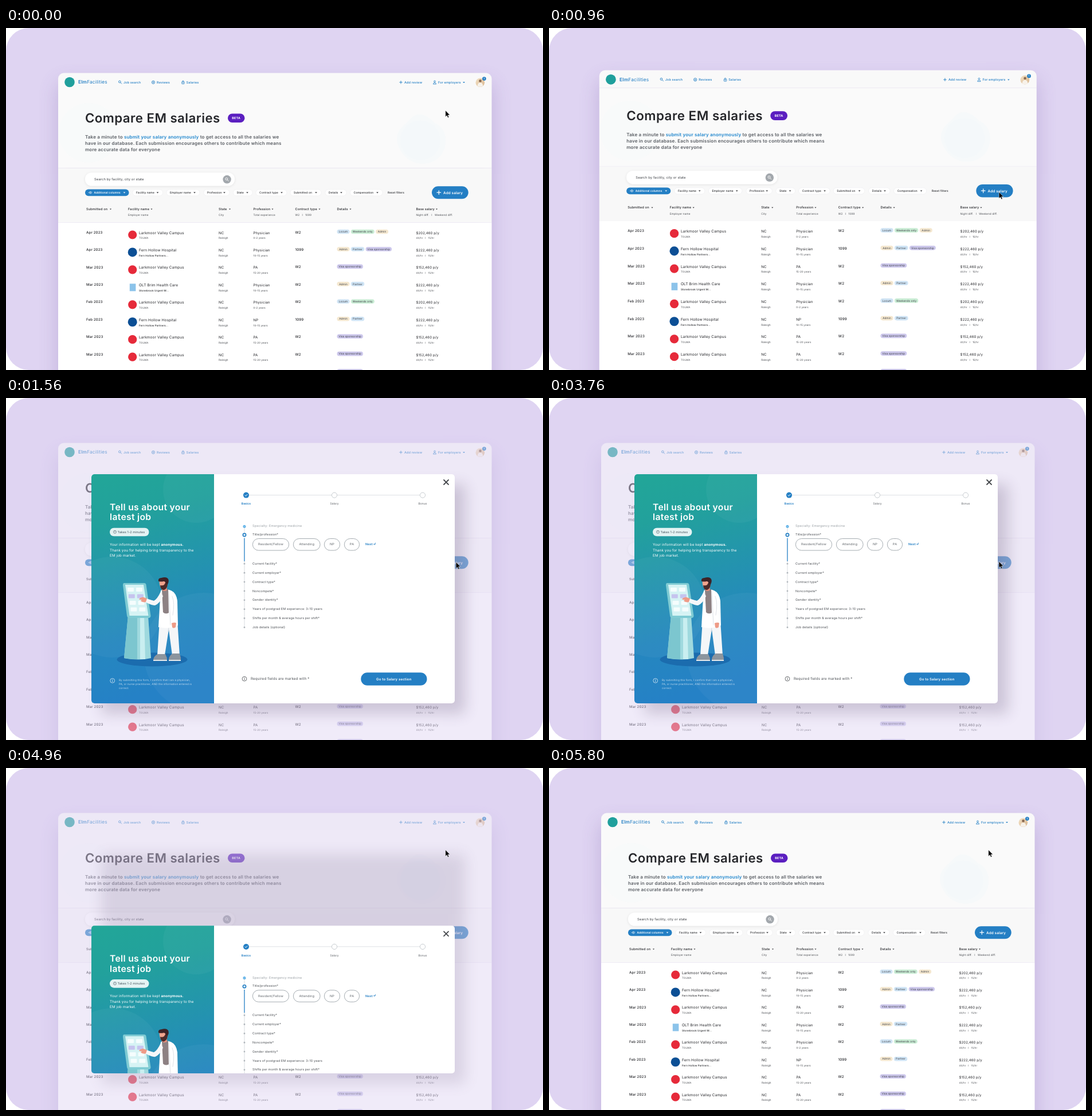
Write an HTML page that moves like this. It is 937 px wide and 597 px high and loops after 6 s.

```html
<!DOCTYPE html>
<html lang="en">
<head>
<meta charset="utf-8">
<title>Salary comparison</title>
<style>
html, body { margin: 0; width: 100%; height: 100%; overflow: hidden; background: #fff; }
svg { display: block; width: 937px; height: 597px; }
text { font-family: Inter, "Open Sans", sans-serif; letter-spacing: .02em; text-rendering: geometricPrecision; white-space: pre; }
</style>
</head>
<body>
<svg id="stage" viewBox="0 0 937 597" xmlns="http://www.w3.org/2000/svg"></svg>
<script>
const BLUE = '#247fc4', INK = '#26272b', GREY = '#4a4d52', LILAC = '#dfd4f2';

// Drawing helpers
const text = (x, y, size, str, fill = INK, weight = 400, anchor = 'start') =>
  `<text x="${x}" y="${y}" font-size="${size}" fill="${fill}" font-weight="${weight}" text-anchor="${anchor}">${str}</text>`;
const rect = (x, y, w, h, r, fill, extra = '') =>
  `<rect x="${x}" y="${y}" width="${w}" height="${h}" rx="${r}" fill="${fill}" ${extra}/>`;
const circle = (x, y, r, fill, extra = '') => `<circle cx="${x}" cy="${y}" r="${r}" fill="${fill}" ${extra}/>`;
const path = (d, fill, extra = '') => `<path d="${d}" fill="${fill}" ${extra}/>`;
const line = (d, color, w = 1, extra = '') => path(d, 'none', `stroke="${color}" stroke-width="${w}" stroke-linecap="round" stroke-linejoin="round" ${extra}`);
const caret = (x, y, fill = INK, s = 1.8) => path(`M${x - s} ${y - s / 2}h${2 * s}l${-s} ${s * 1.15}z`, fill);
const plus = (x, y, s, color, w) => line(`M${x - s} ${y}h${2 * s}M${x} ${y - s}v${2 * s}`, color, w);
const lens = (x, y, s, color, w) =>
  circle(x - s * .25, y - s * .25, s * .7, 'none', `stroke="${color}" stroke-width="${w}"`) +
  line(`M${x + s * .3} ${y + s * .3}l${s * .75} ${s * .75}`, color, w);
const info = (x, y, color) =>
  circle(x, y, 3.9, 'none', `stroke="${color}" stroke-width=".8"`) +
  line(`M${x} ${y - .3}v2`, color, .9) + circle(x, y - 1.9, .55, color);

function navBar() {
  return path('M91 109V88.5a10 10 0 0 1 10-10H837.500a10 10 0 0 1 10 10V109z', '#f9f9f9') +
    circle(111, 94.5, 8.8, '#1f9f9c') +
    `<text x="126" y="97.300" font-size="8.300" fill="${BLUE}"><tspan font-weight="600">Elm</tspan><tspan font-weight="400">Facilities</tspan></text>` +
    lens(199, 94.5, 2.6, BLUE, .9) + text(205, 97, 5.5, 'Job search', BLUE, 500) +
    circle(257, 94.8, 2.6, 'none', `stroke="${BLUE}" stroke-width=".9"`) + circle(257, 94.8, 1, BLUE) +
    text(263, 97, 5.6, 'Reviews', BLUE, 500) +
    rect(306.6, 94, 4.6, 3.6, .8, 'none', `stroke="${BLUE}" stroke-width=".8"`) +
    line('M307.600 94v-.7a1.300 1.300 0 0 1 2.600 0v.7M308.900 95.200v1.200', BLUE, .8) +
    text(314.5, 97, 5.5, 'Salaries', BLUE, 500) +
    plus(689, 94.8, 2.3, BLUE, .9) + text(695, 97, 5.6, 'Add review', BLUE, 500) +
    circle(748, 93.3, 1.4, 'none', `stroke="${BLUE}" stroke-width=".8"`) +
    line('M745.400 97.600q0-2 2.600-2t2.600 2z', BLUE, .8) +
    text(754, 97, 5.6, 'For employers', BLUE, 500) + caret(799, 95, BLUE) +
    circle(827.3, 95.2, 7.8, 'url(#tan)') + circle(827.5, 92.4, 2.3, '#8a6a52') +
    path('M822.600 101.300q.6-6 4.900-6t4.900 6q-4.900 3-9.800 0z', '#f7f2ea') +
    circle(834.4, 88.6, 3.3, BLUE) + text(834.4, 90.2, 4.4, '1', '#fff', 600, 'middle');
}

function hero() {
  return rect(91, 109, 756.5, 135.5, 0, '#fafafa') +
    circle(144, 183, 52, '#f8fafa') +
    path('M684 205C676 178 697 170 707 157C722 143 739 156 748 166C768 174 772 199 762 217C751 241 702 250 684 205z', '#f6f9fa') +
    circle(723, 196, 35, '#f3f8fa', 'opacity=".6"') +
    text(138, 164.6, 22.25, 'Compare EM salaries', INK, 600) +
    rect(387, 149.5, 29.5, 15.5, 7.7, '#5b1fc0') + text(401.7, 159.2, 5.5, 'BETA', '#fff', 700, 'middle') +
    text(138, 192.8, 8, `Take a minute to <tspan fill="#1f86cd">submit your salary anonymously</tspan> to get access to all the salaries we`, '#5a5e64', 600) +
    text(138, 203.8, 8, 'have in our database. Each submission encourages others to contribute which means', '#5a5e64', 600) +
    text(138, 214.8, 8, 'more accurate data for everyone', '#5a5e64', 600);
}

// label, left edge, right edge of each filter pill
const filters = [
  ['Facility name', 221, 273.5], ['Employer name', 280, 338], ['Profession', 345, 390], ['State', 396.5, 430],
  ['Contract type', 436, 490], ['Submitted on', 496, 550], ['Details', 557, 594], ['Compensation', 600.5, 657]
];
// heading, second line, text start, caret centre
const columns = [
  ['Submitted on', '', 140, 182.5], ['Facility name', 'Employer name', 213, 254], ['State', 'City', 371, 390.5],
  ['Profession', 'Total experience', 431.5, 465], ['Contract type', 'W2   I   1099', 504.5, 547],
  ['Details', '', 577.5, 601], ['Base salary', 'Night diff.   I   Weekend diff.', 715.5, 751.5]
];

function tools() {
  let s = rect(91, 244.5, 756.5, 95, 0, '#f8f8f8') +
    rect(138, 252.5, 261, 23, 11.5, '#fff', 'filter="url(#soft)"') +
    text(154, 266.2, 5.8, 'Search by facility, city or state', '#3b3e43') +
    circle(385.6, 264.3, 7.2, '#a3a8ad') + lens(385.5, 264.2, 2.8, '#fff', .9) +
    rect(138, 281.5, 76.5, 11.7, 5.8, BLUE) +
    line('M144.600 287.300q2.700-3.600 5.400 0q-2.700 3.600-5.400 0z', '#fff', .7) + circle(147.3, 287.3, .8, '#fff') +
    text(153.5, 289.1, 4.8, 'Additional columns', '#fff', 600) + caret(206.5, 287.4, '#fff');
  for (const [label, a, b] of filters)
    s += rect(a, 281.8, b - a, 11.2, 5.6, '#fff', 'stroke="#ececee" stroke-width=".6"') +
      text(a + 6, 289.1, 4.85, label, INK, 500) + caret(b - 9, 287.4);
  s += text(666, 289.1, 4.85, 'Reset filters', INK, 500) +
    rect(743, 276.2, 63.7, 22.1, 11, BLUE) + plus(755.3, 287.2, 3.3, '#fff', 1.2) +
    text(763, 289.5, 6.35, 'Add salary', '#fff', 600);
  for (const [head, sub, x, c] of columns)
    s += text(x, 318.1, 5.65, head, INK, 500) + caret(c, 316.2, INK, 1.5) + text(x, 328.2, 4.7, sub, GREY);
  return s;
}

// facility types: name, employer, sign
const places = {
  L: ['Larkmoor Valley Campus', 'TOLMA', y => circle(220.7, y + 4.5, 7.6, '#e62a3a')],
  F: ['Fern Hollow Hospital', 'Fern Hollow Partners...', y => circle(220.7, y + 4.5, 8, '#0c4f95')],
  O: ['OLT Brim Health Care', 'Stonebrook Urgent M...', y => rect(215.8, y - 1.5, 10.6, 13, 0, '#8cc3ea')]
};
const tags = {
  l: ['Locum', 22, '#cfe3f3'], w: ['Weekends only', 41, '#c9ecd4'], a: ['Admin', 22, '#f4e7cf'],
  p: ['Partner', 23.5, '#cfe4f5'], v: ['Visa sponsorship', 45.5, '#cdc8ec']
};
const YEARS = ['0-2', '10-15', '15-20'];
// month, place, profession, years, contract, tags, salary
const rows = [
  ['Apr', 'L', 'Physician', 0, 'W2', 'lwa', 202], ['Apr', 'F', 'Physician', 1, '1099', 'apv', 222],
  ['Mar', 'L', 'PA', 2, 'W2', 'v', 152], ['Mar', 'O', 'Physician', 1, 'W2', 'ap', 222],
  ['Feb', 'L', 'Physician', 0, 'W2', 'lw', 202], ['Feb', 'F', 'NP', 1, '1099', 'ap', 222],
  ['Mar', 'L', 'PA', 2, 'W2', 'v', 152], ['Mar', 'L', 'PA', 2, 'W2', 'v', 152], ['Mar', 'L', 'PA', 2, 'W2', 'v', 152]
];

function table() {
  let s = rect(91, 339.5, 756.5, 300, 0, '#fff');
  rows.forEach(([month, place, job, years, contract, marks, pay], i) => {
    const y = 356.5 + 30.45 * i, [name, employer, sign] = places[place];
    s += text(140, y + 2.1, 6.15, month + ' 2023', INK, 500) + sign(y) +
      text(232, y + 3, 6.45, name) + text(232, y + 11.8, 4.5, employer, place === 'L' ? GREY : INK, place === 'L' ? 400 : 500) +
      text(371, y + 3, 6.2, 'NC') + text(371, y + 11.8, 4.6, 'Raleigh', GREY) +
      text(431.5, y + 3, 6.2, job) + text(431.5, y + 11.8, 4.5, YEARS[years] + ' years', GREY) +
      text(504.5, y + 2, 6.2, contract, INK, 500) +
      text(715.5, y + 3, 6, `$${pay},460 p/y`) + text(715.5, y + 11.8, 4.4, '40/hr   I   15/hr', GREY);
    let x = 577.5;
    for (const m of marks) {
      const [label, w, fill] = tags[m];
      s += rect(x, y - 4.8, w, 7.6, 3.8, fill) + text(x + w / 2, y + .7, 4.7, label, '#3a3d44', 400, 'middle');
      x += w + 2.3;
    }
  });
  return s;
}

function person() {
  let s = `<ellipse cx="255" cy="456.500" rx="61.500" ry="12" fill="#1b6cae"/>` +
    path('M213 380h35l5 74q-20 5-47 0z', '#9fd9de') + path('M213 380h16v76q-14 0-23-2z', '#7cc6cf') +
    path('M234 380h7l2 76h-9z', '#c9eef0') +
    path('M206 323h35q3 0 3.500 3l8 54q0 4-4 4h-33q-4 0-4.500-4l-7-53q0-4 2-4z', '#7fcbd3') +
    path('M208 326h32l8.500 54h-33z', '#d6f3f4');
  for (let r = 0; r < 4; r++)
    for (let c = 0; c < 2; c++)
      s += rect(212 + c * 15 + r * 1.8, 331 + r * 11.5, 11, 7, 1, r === 1 ? '#c6c4ee' : '#f5fdfd');
  return s +
    path('M268 388L264 449h13l7-45l6 45h13l-4-61z', '#f4f6f8') + line('M284 400l-1 8', '#d5dbe2', 1) +
    path('M257 457q1-7 8-10h13l3 7q0 4-2 4h-21q-1 0-1-1z', '#8c959e') + path('M257 457h24v2h-24z', '#e5e8ea') +
    path('M284 456q1-7 7-10h12l2 8q0 4-2 4h-18q-1 0-1-2z', '#8c959e') + path('M284 457h21v2h-21z', '#e5e8ea') +
    path('M270 336q9-4 18 0q9 4 11 18l1 43q-16 7-34 3l2-34z', '#fff') +
    path('M272 334h11l1 41q-6 3-10-1z', '#8d8183') +
    path('M270 338q-6 13-12 16l-13-4l-2 6q11 6 17 6q9-4 14-16z', '#f6f7f9') +
    path('M246 350l-7-2.500q-6 1-7 4l5 1l-2 2q5 3 9 1.500z', '#ee9b87') +
    line('M290 346q5 12 1 33M284 338l3 58', '#d8dde4', .9) +
    path('M289 393q6-2 8 0l-1 7q-4 3-6 0z', '#ee9b87') +
    path('M271 326h9l1 9q-4 4-9 0z', '#e58f7c') +
    path('M267.500 319q7-5 14 0v9q-2 7-8 6q-6-2-6-15z', '#f2a48e') +
    path('M269 327q5 1 7-1l3-5h3q1 11-6 14q-6 1-7-8z', '#4b2a2a') +
    path('M266 320q-1-6 5-6q9-3 12 2q2 4-1 9l-3-1q-1-4-4-4q-4 1-9 0z', '#3d2226');
}

const fields = ['Current facility*', 'Current employer*', 'Contract type*', 'Noncompete*', 'Gender identity*',
  'Years of postgrad EM experience: 3-10 years', 'Shifts per month &amp; average hours per shift*', 'Job details (optional)'];
const titles = [['Resident/Fellow', 430, 64], ['Attending', 501, 47.5], ['NP', 555, 28], ['PA', 590, 27]];

function dialog() {
  const soft = 'rgba(255,255,255,.72)';
  let s = rect(149, 133, 634, 400, 5, '#fff') +
    path('M154 133H363V533H154a5 5 0 0 1-5-5V138a5 5 0 0 1 5-5z', 'url(#sea)') +
    `<g clip-path="url(#side)" fill="#fff" fill-opacity=".035"><circle cx="332" cy="160" r="58"/><circle cx="185" cy="365" r="88"/><circle cx="345" cy="445" r="105"/></g>` +
    text(181, 195.6, 15.7, 'Tell us about your', '#fff', 600) + text(181, 213.2, 15.7, 'latest job', '#fff', 600) +
    rect(181, 226.7, 68.5, 14.6, 7.3, 'rgba(255,255,255,.88)') +
    circle(190, 233.8, 2.5, 'none', 'stroke="#66757d" stroke-width=".8"') + line('M190 232.500v1.400', '#66757d', .7) +
    text(194.5, 235.8, 5.4, 'Takes 1-2 minutes', '#3f4e58') +
    text(181, 258.1, 6.25, 'Your information will be kept <tspan font-weight="700">anonymous.</tspan>', '#fff') +
    text(181, 267.5, 6.25, 'Thank you for helping bring transparency to the', '#fff') +
    text(181, 276.9, 6.25, 'EM job market.', '#fff') + person() + info(185.7, 493.4, 'rgba(255,255,255,.85)') +
    text(197, 494.3, 4.6, 'By submitting this form, I confirm that I am a physician,', soft) +
    text(197, 501.1, 4.6, 'PA, or nurse practitioner, AND the information entered is', soft) +
    text(197, 507.9, 4.6, 'correct.', soft) +
    line('M764 143l8 8m0-8l-8 8', '#46494d', 1.8) + line('M419 169.500H727', '#d6dadd', .8);
  ['Basics', 'Salary', 'Bonus'].forEach((label, i) => {
    const x = 419 + 154 * i;
    s += i ? circle(x, 169.6, 4.6, '#fff', 'stroke="#b9bfc4" stroke-width=".8"')
      : circle(x, 169.6, 5, BLUE) + line('M416.900 169.700l1.500 1.500l2.700-2.900', '#fff', 1);
    s += text(x, 186.2, 4.9, label, i ? '#5a5e63' : BLUE, i ? 400 : 700, 'middle');
  });
  s += line('M416 226v10M416 285V401', '#cfd4d8', .8) + line('M416 245V284.500', BLUE, 1.3) +
    circle(416, 224.2, 2.5, '#58aee6') + line('M415 224.200l.7.7l1.300-1.400', '#fff', .6) +
    circle(416, 239, 2.6, '#fff', `stroke="${BLUE}" stroke-width="1.700"`) +
    text(430, 225.4, 5.6, 'Specialty: Emergency medicine', '#9aa0a5') + text(430, 239.8, 5.5, 'Title/profession*', '#4d5156');
  for (const [label, x, w] of titles)
    s += rect(x + .4, 245.5, w - .8, 20.5, 10.2, '#fff', 'stroke="#8f979d" stroke-width=".8"') +
      text(x + w / 2, 257.4, 5.65, label, '#63686d', 400, 'middle');
  s += text(627, 257.2, 5.5, 'Next', BLUE, 600) + line('M644.500 253v2.300h-2.700m1.100-1.100l-1.100 1.100l1.100 1.100', BLUE, .7);
  fields.forEach((label, i) => {
    const y = 289 + 15.87 * i;
    s += circle(416, y + .3, 1.4, '#b0b6bb') + text(430, y + 1.9, 5.5, label, '#4d5156');
  });
  return s + info(416, 490.2, '#44484c') + text(427, 492.4, 6.25, 'Required fields are marked with *', '#4d5156') +
    rect(619.3, 479.2, 115.2, 22.5, 11.2, BLUE) + text(676.8, 492.6, 6.1, 'Go to Salary section', '#fff', 600, 'middle');
}

const stage = document.getElementById('stage');
stage.innerHTML = `<defs>
  <clipPath id="frame"><rect width="937" height="597" rx="40"/></clipPath>
  <clipPath id="window"><rect x="149" y="133" width="634" height="400" rx="5"/></clipPath>
  <clipPath id="side"><rect x="149" y="133" width="214" height="400" rx="5"/></clipPath>
  <linearGradient id="sea" x1="0" y1="0" x2=".15" y2="1"><stop stop-color="#22a698"/><stop offset=".22" stop-color="#22a19c"/><stop offset=".75" stop-color="#2587bf"/><stop offset="1" stop-color="#2581c6"/></linearGradient>
  <linearGradient id="tan" x1="0" y1="0" x2="1" y2="1"><stop stop-color="#f3e3c8"/><stop offset="1" stop-color="#d9b58c"/></linearGradient>
  <filter id="soft" x="-10%" y="-50%" width="120%" height="220%"><feDropShadow dx="0" dy="1" stdDeviation="2" flood-color="#000" flood-opacity=".09"/></filter>
  <filter id="wide" x="-20%" y="-20%" width="140%" height="140%"><feGaussianBlur stdDeviation="17"/></filter>
  <filter id="near" x="-20%" y="-20%" width="140%" height="140%"><feGaussianBlur stdDeviation="12"/></filter>
</defs>
<g clip-path="url(#frame)">
  <rect width="937" height="597" fill="${LILAC}"/>
  <g id="page">${rect(91, 96, 756.5, 600, 10, '#7a62a8', 'opacity=".3" filter="url(#wide)"')}${navBar()}${hero()}${tools()}${table()}</g>
  <rect id="veil" width="937" height="597" fill="${LILAC}"/>
  <g id="modal">
    ${rect(167, 151, 634, 400, 5, '#5d4d70', 'id="shade" filter="url(#near)"')}
    <g clip-path="url(#window)"><g id="sheet">${dialog()}</g></g>
  </g>
  <g id="cursor">${path('M0 0V11L2.500 8.700L4.200 12.600L6 11.800L4.300 8H7.700z', '#000', 'stroke="#fff" stroke-width=".5"')}</g>
</g>`;

const [page, veil, modal, shade, sheet, cursor] = ['page', 'veil', 'modal', 'shade', 'sheet', 'cursor'].map(id => document.getElementById(id));

const LOOP = 6000, STEP = 40;
const span = (t, a, b) => Math.min(1, Math.max(0, (t - a) / (b - a)));
const inOut = p => p < .5 ? 2 * p * p : 1 - 2 * (1 - p) ** 2;
const out = p => 1 - (1 - p) ** 3;
const pulse = t => 1 + .0098 * (inOut(span(t, 660, 1005)) - inOut(span(t, 1005, 1195)));
const zoom = (s, x, y) => `translate(${x} ${y}) scale(${s}) translate(${-x} ${-y})`;

function draw(t) {
  const visit = t - 40, leave = t - 3720;
  const go = inOut(span(visit, 0, 640)), back = inOut(span(leave, 0, 640));
  const rise = out(span(t, 1140, 1540)), sink = out(span(t, 4900, 5340));
  const shown = rise - sink;
  page.setAttribute('transform', zoom(pulse(visit), 469, 635));
  modal.setAttribute('transform', zoom(pulse(leave), 466, 333));
  modal.setAttribute('visibility', shown > 0 ? 'visible' : 'hidden');
  sheet.setAttribute('transform', `translate(0 ${400 * (1 - shown)})`);
  shade.setAttribute('opacity', .24 * shown);
  veil.setAttribute('opacity', .46 * (inOut(span(t, 1120, 1540)) - inOut(span(t, 5020, 5800))));
  cursor.setAttribute('transform', `translate(${766.8 + 18.4 * (go - back)} ${144 + 142.5 * go - 143.5 * back})`);
}

// The motion advances at 25 pictures a second
function tick() {
  const now = performance.now() % LOOP;
  draw(Math.floor(now / STEP + .05) * STEP);
  requestAnimationFrame(tick);
}
tick();
</script>
</body>
</html>
```
